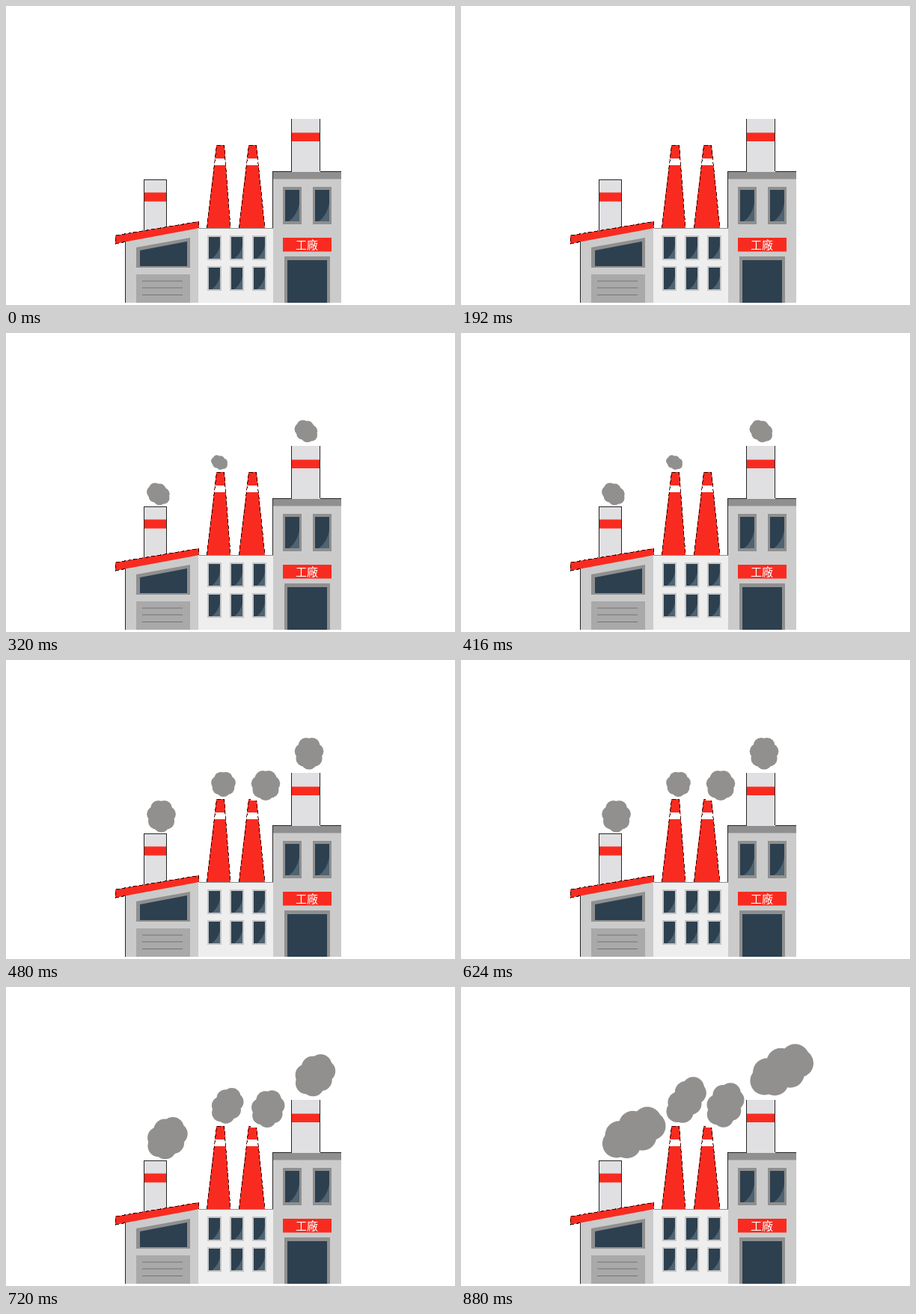
Recreate the animation shown at these times as an HTML page. Size 600 by 400 pixels, loop 960 ms.

```html
<!DOCTYPE html>
<html lang="zh-Hant">
<head>
<meta charset="utf-8">
<title>工廠</title>
<style>
  html, body { margin: 0; width: 100%; height: 100%; overflow: hidden; background: #fff; }
  svg { display: block; }
  .red { fill: #f92b20; }
  .wall { fill: #cbcbcb; }
  .trim { fill: #8f8f8f; }
  .stack { fill: #e0dfe1; }
  .glass { fill: #2d4050; }
  .shine { fill: #506371; }
  .edge { fill: none; stroke: #000; stroke-opacity: .85; shape-rendering: crispEdges; }
  .worn { stroke-dasharray: 5 3; }
  .smoke { fill: #91908e; }
  text { font: 500 15px "Noto Sans CJK TC", "Noto Sans CJK", "Noto Sans CJK JP", sans-serif; fill: #fff; text-anchor: middle; }
</style>
</head>
<body>
<svg width="600" height="400" viewBox="0 0 600 400">
  <defs>
    <g id="pane">
      <path fill="#c6c6c6" d="M0 0h19v33h-19z"/>
      <path class="glass" d="M2 2h15v29h-15z"/>
      <path class="shine" d="M17 14v17h-11q8-6 11-17z"/>
    </g>
    <g id="tallPane">
      <path class="trim" d="M0 0h25v50h-25z"/>
      <path class="glass" d="M3 4h19v42h-19z"/>
      <path class="shine" d="M22 22v24h-14q11-8 14-24z"/>
    </g>
  </defs>

  <path class="stack" d="M185 233h29v70h-29z"/>
  <path class="red" d="M185 249.500h29v12h-29z"/>
  <path class="edge" d="M184.500 301v-68.500h30v64"/>
  <path class="wall" d="M160 314l97-18v101h-97z"/>
  <path class="edge" d="M159.500 315v82"/>
  <path class="red" d="M146 307l112-19v9l-112 21z"/>
  <path class="edge worn" d="M159 315.500l-12.500 2.500v-11l111-18.500v9"/>
  <path class="trim" d="M174 323l72-13v40h-72z"/>
  <path class="glass" d="M179 327l63-12v33h-63z"/>
  <path fill="#a9a9a9" d="M174 359h72v38h-72z"/>
  <path stroke="#747474" d="M182 368h54m-54 9h54m-54 9.500h54"/>

  <path fill="#eee" d="M257 297h100v100h-100z"/>
  <path class="edge" style="stroke-opacity: .4" d="M258 297.500h99"/>
  <path class="red" d="M281 186h11l8 111h-32zM324 186h11l11 111h-35z"/>
  <path fill="#fff" d="M279 204h14l.7 9h-15.500zM322 204h15l.8 9h-16.500z"/>
  <path class="edge worn" d="M268.500 297l13-110.500h10l8.500 110.500M311.500 297l13-110.500h10l11.500 110.500"/>
  <g id="panes"></g>

  <path class="stack" d="M382 151h37v71h-37z"/>
  <path class="red" d="M382 169.500h37v11.500h-37z"/>
  <path class="edge" d="M381.500 151v70m38 0v-70"/>
  <path class="wall" d="M357 222h91v175h-91z"/>
  <path class="trim" d="M357 222h91v9.500h-91z"/>
  <path class="edge" d="M356.500 297v-75.500h25m38 0h28"/>
  <use href="#tallPane" x="370" y="242"/>
  <use href="#tallPane" x="410" y="242"/>
  <path class="red" d="M370 310h65v18.500h-65z"/>
  <text x="402" y="325">工廠</text>
  <path class="trim" d="M372 335h61v62h-61z"/>
  <path class="glass" d="M376 340h53v57h-53z"/>

  <path id="cut" fill="#fff" d="M327 185h9v3h-9z"/>
  <g id="smoke" class="smoke"></g>
</svg>
<script>
const $ = id => document.getElementById(id);

for (const y of [307, 348])
  for (const x of [269, 299, 329])
    $('panes').innerHTML += `<use href="#pane" x="${x}" y="${y}"/>`;

// A ring of round lobes that touches all sides of a box standing on (left, bottom).
// A positive lean stretches it towards the top right.
function cloud(left, bottom, w, h, lean) {
  const lobes = 7, r = 0.27 * Math.min(w, h);
  let ring = '', circles = '';
  for (let i = 0; i < lobes; i++) {
    const a = 2 * Math.PI * (i + 0.25) / lobes;
    const x = left + w / 2 + (w / 2 - r) * Math.cos(a - lean / 2);
    const y = bottom - h / 2 - (h / 2 - r) * Math.sin(a + lean / 2);
    ring += `${x},${y} `;
    circles += `<circle cx="${x}" cy="${y}" r="${r}"/>`;
  }
  return `<polygon points="${ring}"/>` + circles;
}

// The smoke swells in steps; the wide plumes double their growth each time.
function smoke(step) {
  if (!step) return '';
  const lean = 0.4 * (step - 2);
  const wide = (x, y) => cloud(x, y, 23.5 + 3.9 * 2 ** step, 17 + 13.3 * step, lean);
  return wide(385.5, 146.5) + wide(188, 230.5) +
    cloud(274, 183, 12 + 10.5 * step, 5.5 + 14.3 * step, lean) +
    (step > 1 ? cloud(327.5, 188, 27 + 6 * step, 21.5 + 9.7 * step, lean / 2) : '');
}

const loop = 960, starts = [320, 480, 720, 880];
let shown;

function draw(now) {
  const t = now % loop;
  const step = starts.filter(s => s <= t).length;
  if (step !== shown) {
    shown = step;
    $('smoke').innerHTML = smoke(step);
    $('cut').style.display = step > 1 ? '' : 'none';
  }
}

let began;
function tick(now) {
  began ??= now;
  draw(now - began);
  requestAnimationFrame(tick);
}
draw(0);
requestAnimationFrame(tick);
</script>
</body>
</html>
```
